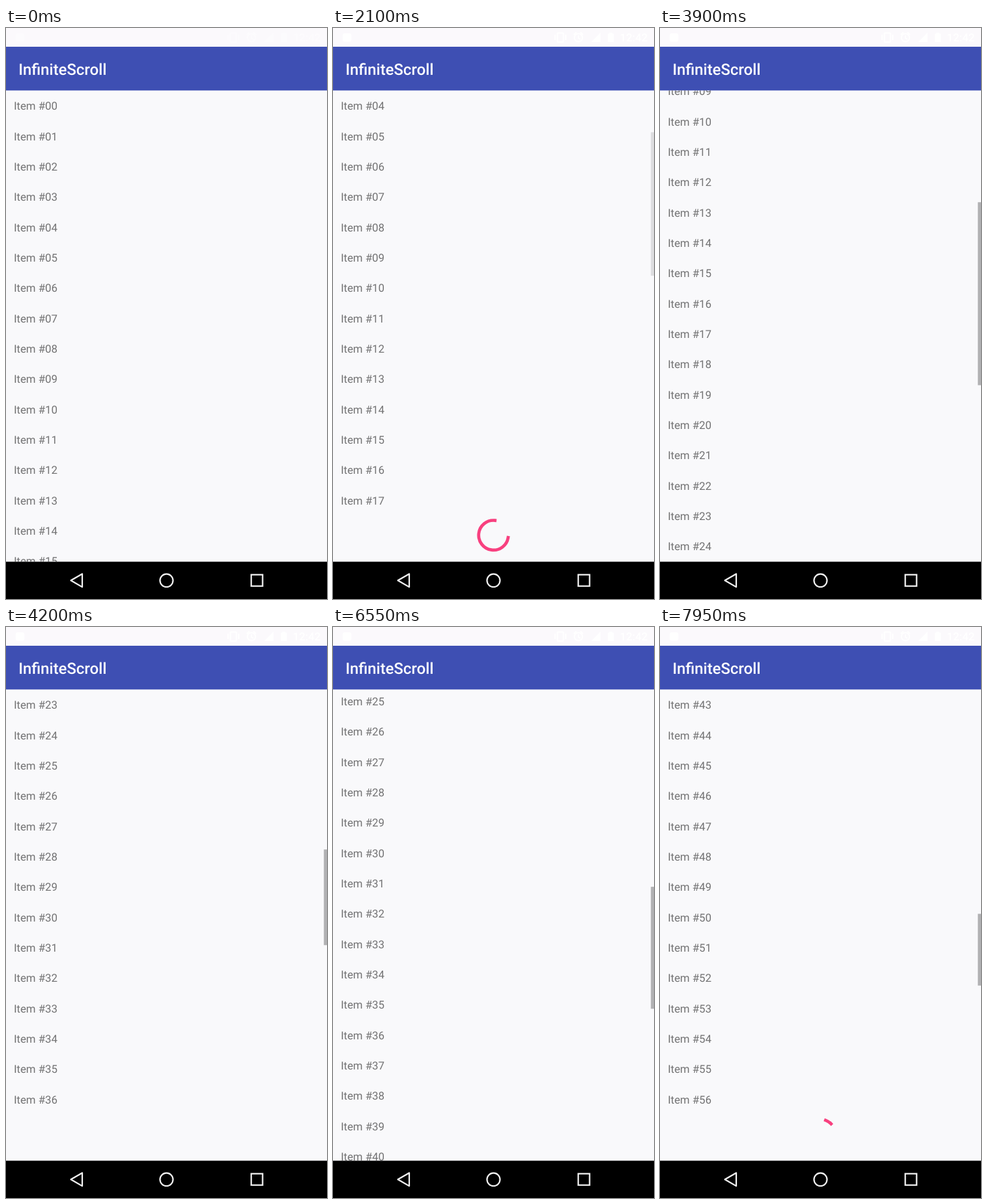
Write an HTML page that moves like this. It is 480 px wide and 853 px high and loops after 8 s.

```html
<!DOCTYPE html>
<html lang="en">
<head>
<meta charset="utf-8">
<title>Infinite list</title>
<style>
  html, body { margin: 0; width: 100%; height: 100%; overflow: hidden; background: #000; }
  svg { display: block; }
  text { font-family: Roboto, sans-serif; text-rendering: geometricPrecision; }
  #rows text { font-size: 16.33px; fill: #727273; }
</style>
</head>
<body>
<svg id="stage" width="100%" height="100%" viewBox="0 0 480 853">
  <rect width="480" height="853" fill="#f9f9fb"/>
  <rect width="480" height="28" fill="#fbf9fc"/>

  <g id="status" fill="#fff">
    <rect x="14.5" y="8" width="13" height="12.5" rx="3"/>
    <g fill="none" stroke="#fff" stroke-width="2">
      <rect x="335.5" y="7.5" width="9" height="13.5" rx="1"/>
      <path d="M332 10v8M348 10v8M360 10l4-3.500M374 10l-4-3.500M367 11v4l3 2"/>
      <circle cx="367" cy="14.500" r="6"/>
    </g>
    <path d="M386 21H400V7Z"/>
    <path d="M411 8.500h2.500v-1.500h4v1.500h2.500v12.500h-9z"/>
    <text x="429" y="20.300" font-size="16.33" font-weight="500">12:42</text>
  </g>

  <rect y="28" width="480" height="65.33" fill="#3e4fb3"/>
  <text x="18.67" y="69.600" font-size="23.33" font-weight="500" fill="#fff">InfiniteScroll</text>

  <svg id="list" y="93.33" width="480" height="704" overflow="hidden"><g id="rows"></g></svg>
  <rect id="thumb" x="475.300" width="4.700" fill="#b1b1b3"/>
  <path id="arc" fill="none" stroke="#f8407f" stroke-width="4.670" stroke-linecap="square"/>

  <rect y="797.33" width="480" height="56" fill="#000"/>
  <g fill="none" stroke="#f2f2f2" stroke-width="2.200">
    <path d="M97 825.300L114 815.500V835.100Z" stroke-linejoin="round"/>
    <circle cx="240" cy="825.300" r="9.700"/>
    <rect x="366.700" y="816.700" width="17" height="17"/>
  </g>
</svg>
<script>
const LOOP = 8000, STEP = 50, ROW = 136 / 3, TOP = 93.33;
const FULL = 704, SHORT = 623.5, LOAD = 1550;
const $ = id => document.getElementById(id);
const clamp = v => Math.min(1, Math.max(0, v));

// A page load snaps the list to its first visible row.
const loads = [[1550, 4], [4200, 23], [7850, 43]];
// Start and end of each scroll, for the scrollbar.
const scrolls = [[1450, 1550], [3800, 4200], [6400, 6650], [7150, 7850]];
// Finger positions: time, offset in px.
const drags = [
  [[1450, 9.3], [1500, 95], [1550, 190]],
  [[3800, 193], [3850, 295], [3900, 430], [4000, 690], [4100, 905], [4200, 1070]],
  [[6400, 1049], [6450, 1079], [6550, 1138.9], [6600, 1158], [6650, 1166]],
  [[7150, 1185], [7200, 1270], [7250, 1395], [7350, 1649.3]]
];

function follow(points, t) {
  for (let i = 1; i < points.length; i++) {
    const [t0, y0] = points[i - 1], [t1, y1] = points[i];
    if (t <= t1) return y0 + (y1 - y0) * (t - t0) / (t1 - t0);
  }
  return points[points.length - 1][1];
}

function offsetAt(t) {
  const load = loads.findLast(l => l[0] <= t);
  const drag = drags.findLast(d => d[0][0] <= t);
  if (!drag) return 0;
  if (load && load[0] > drag[0][0]) return load[1] * ROW;
  if (t > 7350) return 1649.3 + 340 * (1 - Math.exp((7350 - t) / 170));
  return follow(drag, t);
}

function thumbAlpha(t) {
  const s = scrolls.findLast(s => s[0] <= t);
  return s ? 1 - clamp((t - s[1] - 400) / 250) : 0;
}

// Ease from 0 to 1 along a cubic whose x ends at 0.5.
function ease(x, x1, x2) {
  let lo = 0, hi = 1;
  for (let i = 0; i < 24; i++) {
    const s = (lo + hi) / 2, r = 1 - s;
    if (3 * r * r * s * x1 + 3 * r * s * s * x2 + s * s * s * 0.5 < x) lo = s;
    else hi = s;
  }
  return lo * lo * (3 - 2 * lo);
}

function arcPath(ms) {
  const p = ms % 1333 / 1333;
  const turn = p * 0.25 + ms * 2 / 6665;
  const tail = p < 0.5 ? 0 : ease(p - 0.5, 0.2, 0.1);
  const head = p < 0.5 ? ease(p, 0.2, 0.1) : 1;
  const at = f => {
    const a = (f * 0.75 + turn) * 2 * Math.PI;
    return (240 + 22.17 * Math.sin(a)).toFixed(2) + " " + (757.7 - 22.17 * Math.cos(a)).toFixed(2);
  };
  const sweep = (head - tail) * 0.75;
  return `M${at(tail)}A22.17 22.17 0 ${sweep > 0.5 ? 1 : 0} 1 ${at(head + 0.0005)}`;
}

const labels = Array.from({ length: 17 }, () => {
  const el = document.createElementNS("http://www.w3.org/2000/svg", "text");
  el.setAttribute("x", 11.67);
  return $("rows").appendChild(el);
});

function set(id, attrs) {
  for (const k in attrs) $(id).setAttribute(k, attrs[k]);
}

function draw(time) {
  const t = Math.floor(time / STEP) * STEP;
  const y = offsetAt(t), first = Math.floor(y / ROW + 1e-6);
  const begun = loads.filter(l => l[0] <= t);
  const count = 20 + 20 * begun.length;
  const age = begun.length ? t - begun[begun.length - 1][0] : LOAD;
  const loading = age < LOAD;
  const view = loading ? SHORT : FULL;

  labels.forEach((el, i) => {
    const n = first + i;
    el.textContent = n < count ? "Item #" + String(n).padStart(2, "0") : "";
    el.setAttribute("y", (n * ROW - y + 29.1).toFixed(2));
  });
  set("list", { height: view });

  const ratio = view / (count * ROW);
  set("thumb", { y: TOP + y * ratio, height: view * ratio, opacity: thumbAlpha(t) });
  set("arc", { d: loading && age > 0 ? arcPath(age + 15) : "" });
  set("status", { opacity: t < 1550 ? 0.4 : 1 });
}

function frame() {
  draw(performance.now() % LOOP);
  requestAnimationFrame(frame);
}
frame();
</script>
</body>
</html>
```
